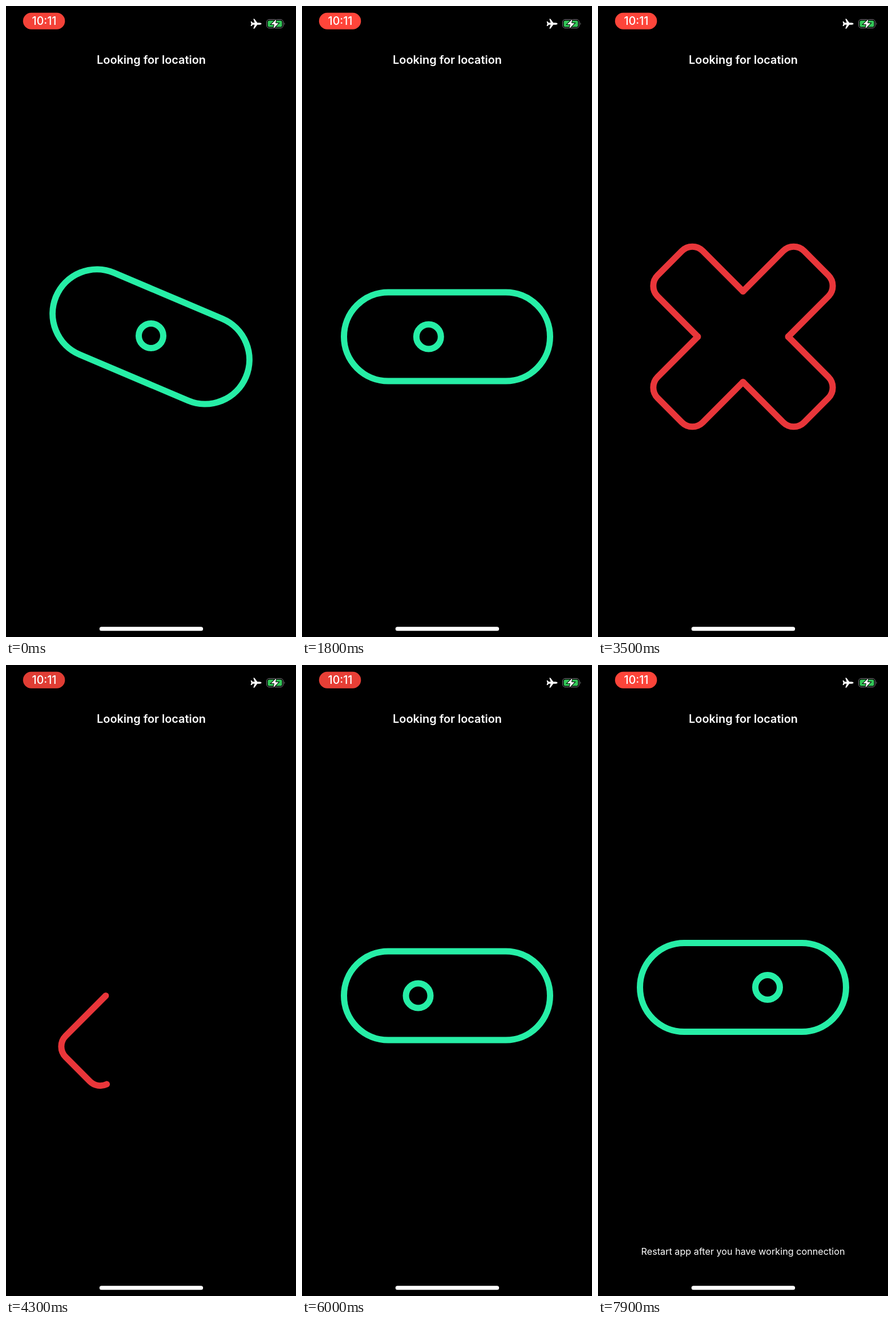
An HTML page for the animation above (8 s loop, 508 by 1102 pixels).

```html
<!DOCTYPE html>
<html lang="en">
<head>
<meta charset="utf-8">
<title>Looking for location</title>
<style>
  html, body { margin: 0; height: 100%; overflow: hidden; background: #000; }
  svg { display: block; }
  text { font-family: Inter, sans-serif; fill: #fff; text-anchor: middle; }
  #figure { fill: none; stroke-width: 11; stroke-linecap: round; }
</style>
</head>
<body>
<svg width="508" height="1102" viewBox="0 0 508 1102">
  <rect id="badge" x="29.8" y="11.800" width="73.500" height="29" rx="14.5"/>
  <text x="67" y="33.3" font-size="19.5" font-weight="500">10:11</text>

  <path fill="#fff" d="M447.500 31Q447.500 32.700 444 32.700H440.200L435.300 39.500H433.200L435.700 32.700H432.200L430.300 35H428.600L429.700 31L428.600 27H430.300L432.200 29.300H435.700L433.200 22.500H435.300L440.200 29.300H444Q447.500 29.300 447.500 31Z"/>

  <rect x="456.500" y="23.500" width="29" height="15" rx="4.500" fill="none" stroke="#77777b"/>
  <path d="M487.300 28.500Q489.500 31 487.300 33.500Z" fill="#77777b"/>
  <rect x="458.500" y="25.500" width="25" height="11" rx="2.800" fill="#34c759"/>
  <path d="M473.500 23L464.500 32H470L468.500 39.500L477.500 30H472Z" fill="#fff" stroke="#000" stroke-width="2" paint-order="stroke"/>

  <text x="254.500" y="101" font-size="19.9" font-weight="600">Looking for location</text>
  <g id="figure">
    <rect id="pill" x="-180.500" y="-77.500" width="361" height="155" rx="77.500" pathLength="1"/>
    <circle id="pupil"/>
    <g id="cross"></g>
  </g>
  <text id="hint" x="254" y="1030" font-size="16.2">Restart app after you have working connection</text>
  <rect x="163.700" y="1084.200" width="181.500" height="7" rx="3.500" fill="#fff"/>
</svg>
<script>
const LOOP = 8000, CROSS_START = 2700, CROSS_END = 4445, HINT_START = 6900;
const GREEN = [38, 238, 166], RED = [233, 54, 58];
const [badge, figure, pill, pupil, cross, hint] =
  ['badge', 'figure', 'pill', 'pupil', 'cross', 'hint'].map(id => document.getElementById(id));

const set = (el, attrs) => { for (const k in attrs) el.setAttribute(k, attrs[k]); };
const show = (el, on) => { el.style.display = on ? '' : 'none'; };
const ramp = (t, from, to) => Math.min(1, Math.max(0, (t - from) / (to - from)));
const ease = (t, from, to) => (1 - Math.cos(Math.PI * ramp(t, from, to))) / 2;
const mix = (a, b, p) => a + (b - a) * p;
const mixColor = (a, b, p) => `rgb(${a.map((v, i) => Math.round(mix(v, b[i], p)))})`;

// In erasing order: left, top, right, bottom
const arms = [-90, 0, 90, 180].map(angle => {
  const arm = document.createElementNS('http://www.w3.org/2000/svg', 'path');
  set(arm, { transform: `rotate(${angle})`, pathLength: 1 });
  return cross.appendChild(arm);
});

function armPath(half, length, radius, overlap) {
  const arc = `A${radius} ${radius} 0 0 1`;
  return `M${-half} ${-half}V${radius - length}${arc} ${radius - half} ${-length}` +
    `H${half - radius}${arc} ${half} ${radius - length}V${overlap - half}`;
}

function drawEye(t) {
  const u = t < CROSS_START ? t - 156 : t - 5153;   // time from the middle of the spin
  const left = Math.max(0, 91 * Math.exp(-Math.abs(u) / (u < 0 ? 116 : 148)) - 1);
  const drawn = t < CROSS_START ? 1 : ease(t, 4480, 4780);
  set(pill, {
    transform: `rotate(${u < 0 ? left : 180 - left})`,
    'stroke-dasharray': drawn < 1 ? `${drawn} 2` : 'none'
  });
  show(pill, drawn > 0);

  const size = t < CROSS_START ? 1 - ease(t, 2500, 2650) : ease(t, 4550, 4750);
  set(pupil, {
    cx: -95 * ease(u, 536, 1136) + 190 * ease(u, 1333, 2133) - 95 * ease(u, 2430, 3030),
    cy: -24 * (left / 90) ** 2,
    r: 21.5 * size,
    'stroke-width': 11 * size
  });
}

function drawCross(t) {
  const turn = ease(t, CROSS_START, 3300), grow = ease(t, CROSS_START, 2920);
  const half = mix(75.2, 56, turn);
  const erased = 4 * ramp(t, 3600, CROSS_END);
  cross.setAttribute('transform', `rotate(${45 * turn})`);
  arms.forEach((arm, i) => {
    const wide = i % 2 === 0;
    const length = wide ? 181.5 : mix(half, 181.5, grow);
    const radius = wide ? mix(half, 26, grow) : Math.min(26, length - half);
    const gone = ramp(erased, i, i + 1);
    set(arm, {
      d: armPath(half, length, radius, 58 * turn * (1 - turn)),
      'stroke-dasharray': gone ? `${1 - gone} 2` : 'none',
      'stroke-dashoffset': -gone
    });
    show(arm, gone < 1);
  });
}

function frame(now) {
  const t = now % LOOP;
  const crossed = t >= CROSS_START && t < CROSS_END;
  const glow = (1 + Math.cos((t - 1850) / 1550 * 2 * Math.PI)) / 2;
  badge.setAttribute('fill', mixColor([222, 60, 52], [255, 69, 58], glow));
  set(figure, {
    transform: `translate(254 ${t < HINT_START ? 577.5 : 563})`,
    stroke: mixColor(GREEN, RED, t < CROSS_END ? ramp(t, 2600, 2760) : 0)
  });
  show(hint, t >= HINT_START);
  show(pill, !crossed);
  show(pupil, !crossed);
  show(cross, crossed);
  (crossed ? drawCross : drawEye)(t);
  requestAnimationFrame(frame);
}
requestAnimationFrame(frame);
</script>
</body>
</html>
```
